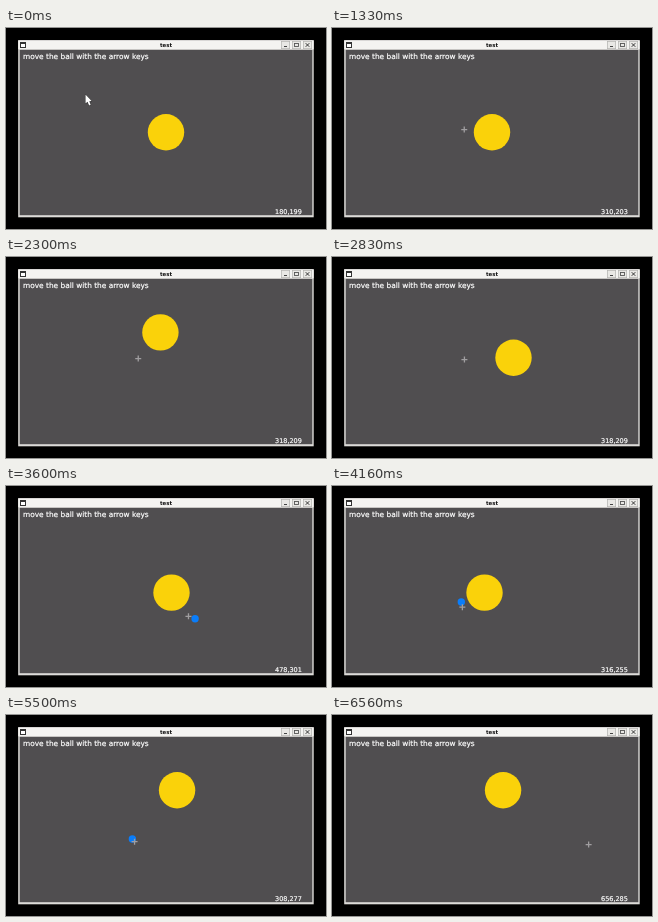
Animation of 320 by 201 pixels, one loop 6.64 s. Source, as an HTML page with a canvas:

```html
<!DOCTYPE html>
<html lang="en">
<head>
<meta charset="utf-8">
<title>test</title>
<style>
  html, body { margin: 0; width: 100%; height: 100%; overflow: hidden; background: #000; }
  canvas, svg { position: absolute; left: 0; top: 0; width: 320px; height: 201px; }
  text { font-family: "DejaVu Sans", sans-serif; }
  .game { fill: #fff; stroke: #fff; stroke-width: 0.2; }
</style>
</head>
<body>
<canvas id="stage" width="320" height="201"></canvas>
<svg viewBox="0 0 320 201">
  <text x="160" y="18.6" font-size="5.4" font-weight="bold" text-anchor="middle" fill="#111">test</text>
  <text class="game" x="17" y="31.3" font-size="7.4">move the ball with the arrow keys</text>
  <text class="game" id="pos" x="269" y="186.3" font-size="6.5"></text>
</svg>
<script>
const LOOP = 6640;
const LAG = 60;          // the game sees the pointer slightly late
const SCALE = 2.717;     // game units per pixel
const SPEED = 0.09;      // ball, pixels per ms
const ctx = document.getElementById('stage').getContext('2d');
const label = document.getElementById('pos');

// When each arrow key goes down and up
const held = {
  left:  [[1440, 1768], [3000, 3178], [3660, 3804]],
  right: [[2035, 2602], [4280, 4386], [5180, 5280]],
  up:    [[1980, 2319], [2760, 3175], [4950, 5299]],
  down:  [[2380, 2750], [3180, 3590]]
};

// Pointer sweeps in game units: eased curves that chain from end to end
const sweeps = [
  { from: 660,  to: 1333, bend: [145, 74],  end: [318, 209] },
  { from: 2800, to: 3300, bend: [340, 330], end: [533, 335] },
  { from: 3300, to: 4360, bend: [311, 190], end: [311, 276] },
  { from: 4930, to: 5440, bend: [309, 276], end: [308, 277] },
  { from: 5600, to: 6480, bend: [370, -30], end: [656, 285] }
];

const clamp = (v, lo, hi) => Math.min(hi, Math.max(lo, v));

function travel(key, t) {
  return held[key].reduce((sum, [a, b]) => sum + SPEED * (clamp(t, a, b) - a), 0);
}

function ballAt(t) {
  return [160 + travel('right', t) - travel('left', t),
          104.3 + travel('down', t) - travel('up', t)];
}

function mouseAt(t) {
  let p = [180, 199];
  for (const { from, to, bend, end } of sweeps) {
    if (t <= from) break;
    const k = Math.min(1, (t - from) / (to - from));
    const s = k * k * (3 - 2 * k), r = 1 - s;
    p = p.map((v, i) => r * r * v + 2 * r * s * bend[i] + s * s * end[i]);
  }
  return p;
}

function rect(color, x, y, w, h) {
  ctx.fillStyle = color;
  ctx.fillRect(x, y, w, h);
}

function disc(color, x, y, r) {
  ctx.fillStyle = color;
  ctx.beginPath();
  ctx.arc(x, y, r, 0, Math.PI * 2);
  ctx.fill();
}

function lines(color, width, ...segments) {
  ctx.strokeStyle = color;
  ctx.lineWidth = width;
  ctx.beginPath();
  for (const [x1, y1, x2, y2] of segments) {
    ctx.moveTo(x1, y1);
    ctx.lineTo(x2, y2);
  }
  ctx.stroke();
}

function drawWindow() {
  rect('#000', 0, 0, 320, 201);
  rect('#dcdbd8', 12.2, 12.3, 295.5, 177);
  rect('#f4f3f1', 12.2, 12.3, 295.5, 9);
  rect('#504e50', 13.7, 21.8, 292.6, 165.4);

  rect('#333', 14, 14, 6, 6);
  rect('#fff', 15, 16, 4, 3);

  for (const x of [275, 286, 297]) {
    rect('#b4b3b0', x, 13, 9, 8);
    rect('#e9e8e5', x + 0.7, 13.7, 7.6, 6.6);
  }
  rect('#444', 278, 18, 3, 1);
  ctx.strokeStyle = '#555';
  ctx.lineWidth = 0.9;
  ctx.strokeRect(288.5, 15.5, 4, 3);
  lines('#333', 1, [299.7, 15.2, 303.3, 18.8], [303.3, 15.2, 299.7, 18.8]);
}

function drawArrow(x, y) {
  const outline = [[0, 0], [0, 9], [2, 7.3], [3.6, 11], [5.2, 10.2], [3.8, 6.8], [6.2, 6.5]];
  ctx.beginPath();
  for (const [dx, dy] of outline) ctx.lineTo(x + dx, y + dy);
  ctx.closePath();
  ctx.strokeStyle = '#222';
  ctx.lineWidth = 0.9;
  ctx.stroke();
  ctx.fillStyle = '#fff';
  ctx.fill();
}

function drawCross(x, y) {
  lines('#a09ea0', 1.3, [x - 3, y, x + 3, y], [x, y - 3, x, y + 3]);
}

function draw(t) {
  drawWindow();
  disc('#fad20a', ...ballAt(t), 18.2);

  const [gx, gy] = mouseAt(t - LAG);
  label.textContent = Math.round(gx) + ',' + Math.round(gy);
  if (t >= 3350 && t < 5550) disc('#0a7dfa', 13 + gx / SCALE, 22 + gy / SCALE, 3.7);

  if (t < 660) {
    const k = t / 660;
    drawArrow(79.5 + k, 66.5 + 28 * k);
  } else {
    const [mx, my] = mouseAt(t);
    drawCross(15.2 + mx / SCALE, 24.7 + my / SCALE);
  }
}

const start = performance.now();
function tick() {
  draw((performance.now() - start) % LOOP);
  requestAnimationFrame(tick);
}
tick();
</script>
</body>
</html>
```
